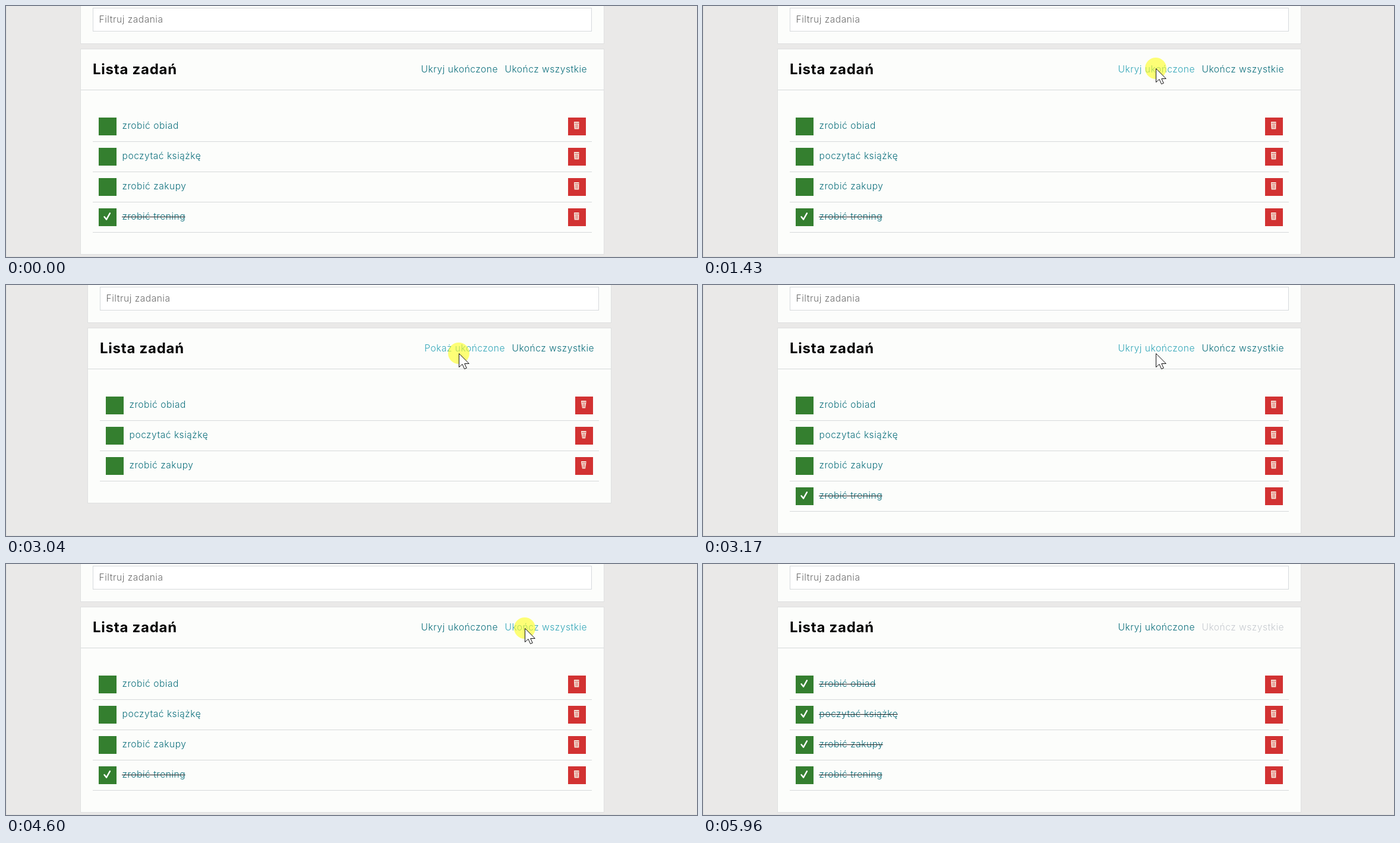
Write an HTML page that moves like this. It is 1163 px wide and 423 px high and loops after 6550 ms.

```html
<!DOCTYPE html>
<html lang="pl">
<head>
<meta charset="utf-8">
<title>Lista zadań</title>
<style>
  html, body { margin: 0; width: 100%; height: 100%; overflow: hidden; background: #eae9e8; }
  svg { display: block; }
  text { font: 300 15.6px Inter, "Open Sans", sans-serif; letter-spacing: .5px; fill: #0c6f7c; }
  .title { font-weight: 700; font-size: 24px; letter-spacing: .75px; fill: #000; }
  .hint { fill: #6c6c6c; }
  .panel { fill: #fcfdfb; stroke: #dfe0e0; }
  .input { fill: #fff; stroke: #d6d9dc; }
  .line { stroke: #d6d9da; }
  .tick { fill: none; stroke: #fff; stroke-width: 2.4; stroke-linejoin: round; stroke-linecap: round; }
  .strike { stroke: #222; }
  .row:not(.done) :is(.tick, .strike) { visibility: hidden; }
  .bin { fill: #f4e4d8; }
  .slits { stroke: #d23232; stroke-width: .8; }
  #press { fill: #ffff1e; fill-opacity: .6; }
  #cursor { fill: #fff; stroke: #111; }
</style>
</head>
<body>
<svg width="1163" height="423" viewBox="0 0 1163 423">
  <path d="M.5 0v422.5h1163" fill="none" stroke="#dedede"/>
  <g id="page">
    <rect class="panel" x="125.5" y="-9.5" width="881" height="73"/>
    <rect class="input" x="146.5" y="3.5" width="839" height="39"/>
    <text class="hint" x="156.5" y="28">Filtruj zadania</text>
    <rect class="panel" id="card" x="125.5" y="72.5" width="881"/>
    <path class="line" d="M126 141.5h880"/>
    <text class="title" x="146" y="115">Lista zadań</text>
    <text id="toggle" x="828" y="112" text-anchor="end"></text>
    <text id="finish" x="839.5" y="112">Ukończ wszystkie</text>
    <g id="rows"></g>
  </g>
  <circle id="press" r="18"/>
  <path id="cursor" d="M.5 .5V23.5L6 18.5L9.6 26.5L13.2 25L9.8 17.5H17.3Z"/>
</svg>
<script>
  const LOOP = 6550, ROW = 51;
  const $ = id => document.getElementById(id);
  const clamp = v => Math.min(1, Math.max(0, v));
  const progress = (t, start, end) => clamp((t - start) / (end - start));
  const mix = (a, b, p) => a.map((v, i) => v + (b[i] - v) * p);
  const rgb = c => `rgb(${c.map(Math.round)})`;
  const show = (el, on) => el.style.display = on ? "" : "none";
  const easeIn = p => p * p;
  const easeOut = p => 1 - easeIn(1 - p);

  const tasks = ["zrobić obiad", "poczytać książkę", "zrobić zakupy", "zrobić trening"];
  $("rows").innerHTML = tasks.map((name, i) => `
    <g class="row" transform="translate(0 ${188 + ROW * i})">
      <rect x="156" width="30" height="30" fill="#347f2f"/>
      <path class="tick" transform="translate(156 0)" d="M9.5 14.2l3.6 4.5l5.9-10.5"/>
      <text x="195.5" y="19">${name}</text>
      <path class="strike"/>
      <g transform="translate(946 0)">
        <rect width="30" height="30" fill="#d23232"/>
        <path class="bin"/>
        <path class="slits" d="M11 9.5h7M13.3 11v7M15.7 11v7"/>
      </g>
      <path class="line" d="M146 40.5h840"/>
    </g>`).join("");
  const rows = [...document.querySelectorAll(".row")];
  for (const row of rows) {
    const width = row.querySelector("text").getComputedTextLength();
    row.querySelector(".strike").setAttribute("d", `M195 14.5h${width}`);
  }

  // Button down and up times
  const hide = [1360, 1510], reveal = [3040, 3170], complete = [4530, 4665];
  const clicks = [hide, reveal, complete];

  const ENTER = 400, LEAVE = 5955;
  const entry = [1014, 391];
  const glides = [
    { start: ENTER, end: 1020, to: [762, 105], ease: easeOut, bow: 0 },
    { start: 1910, end: 1980, to: [762, 115], ease: easeOut, bow: 0 },
    { start: 3700, end: 4330, to: [873, 108], ease: easeOut, bow: 7 },
    { start: 5350, end: LEAVE, to: [1105, 423], ease: easeIn, bow: 0 },
  ];

  // Each glide advances in nine jumps
  function pointer(t) {
    return glides.reduce((at, { start, end, to, ease, bow }) => {
      const p = ease(Math.round(progress(t, start, end) * 9) / 9);
      const [x, y] = mix(at, to, p);
      return [x, y + bow * Math.sin(Math.PI * p)];
    }, entry);
  }

  const BASE = [12, 111, 124], HOVER = [50, 166, 184], OFF = [198, 202, 207];
  const fade = (t, start) => progress(t, start, start + 300);

  function draw(t) {
    const hidden = t >= hide[1] && t < reveal[1];
    const allDone = t >= complete[1];

    $("page").setAttribute("transform", `translate(${hidden ? 12 : 0} 0)`);
    $("card").setAttribute("height", 346 - (hidden ? ROW : 0));
    const taper = hidden ? 1.2 : 0;
    rows.forEach((row, i) => {
      const last = i === rows.length - 1;
      row.classList.toggle("done", allDone || last);
      show(row, !(hidden && last));
      row.querySelector(".bin").setAttribute("d",
        `M10 7h8.5v2.5L${18.3 - taper} 19.5H${10.7 + taper}L10 9.5z`);
    });

    $("toggle").textContent = hidden ? "Pokaż ukończone" : "Ukryj ukończone";
    $("toggle").style.fill = rgb(mix(BASE, HOVER, fade(t, 950) - fade(t, 3740)));
    const hover = mix(BASE, HOVER, fade(t, 3980));
    $("finish").style.fill = rgb(mix(hover, OFF, fade(t, complete[1])));

    const at = pointer(t).map(Math.round);
    for (const id of ["cursor", "press"]) $(id).setAttribute("transform", `translate(${at})`);
    show($("cursor"), t >= ENTER && t < LEAVE);
    show($("press"), clicks.some(([down, up]) => t >= down && t < up));
  }

  const begin = performance.now();
  function frame() {
    draw((performance.now() - begin) % LOOP);
    requestAnimationFrame(frame);
  }
  frame();
</script>
</body>
</html>
```
